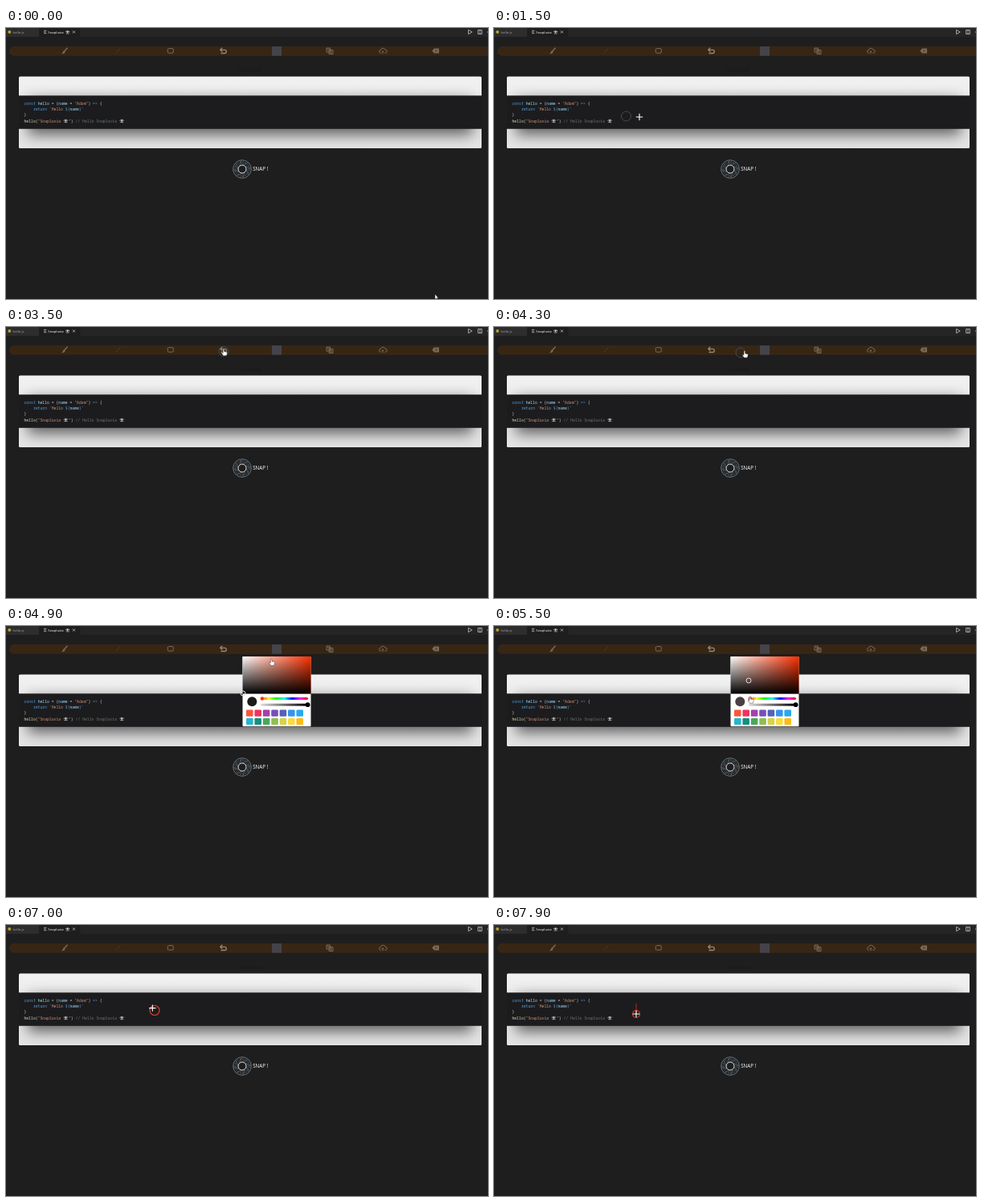
Animation of 600 by 338 pixels, one loop 8 s. Source, as an HTML page:

```html
<!DOCTYPE html>
<html lang="en">
<head>
<meta charset="utf-8">
<title>Code snapshot</title>
<style>
  html, body { margin: 0; width: 100%; height: 100%; overflow: hidden; background: #1e1e1e; }
  svg { display: block; width: 100vw; height: 100vh; }
  text { white-space: pre; }
  .ui { font-family: "Open Sans", "Noto Sans", sans-serif; }
  .code { font: 4.75px "Noto Sans Mono", "DejaVu Sans Mono", monospace; fill: #d4d4d4; }
  .kw { fill: #569cd6; } .id { fill: #9cdcfe; } .fn { fill: #dcdcaa; }
  .str { fill: #ce9178; } .note { fill: #68766a; }
  .icon { fill: none; stroke: #786b5c; stroke-width: 1; stroke-linejoin: round; }
  .solid { fill: #786b5c; stroke: none; }
</style>
</head>
<body>
<svg viewBox="0 0 600 338" preserveAspectRatio="none">
  <defs>
    <linearGradient id="card" x2="0" y2="1">
      <stop stop-color="#f1f1f1"/><stop offset="1" stop-color="#e4e4e4"/>
    </linearGradient>
    <linearGradient id="sat"><stop stop-color="#fff"/><stop offset="1" stop-color="#ff3000"/></linearGradient>
    <linearGradient id="val" x2="0" y2="1"><stop stop-opacity="0"/><stop offset="1"/></linearGradient>
    <linearGradient id="alpha"><stop stop-color="#ddd"/><stop offset="1" stop-color="#000"/></linearGradient>
    <linearGradient id="hue"></linearGradient>
    <filter id="soft" x="-10%" y="-80%" width="120%" height="260%"><feGaussianBlur stdDeviation="9"/></filter>
    <clipPath id="cardClip"><rect x="16" y="60.5" width="576" height="89.5" rx="1.5"/></clipPath>
    <g id="eye" fill="none" stroke="#e4e4e4" stroke-width=".7">
      <path d="M0-2.4Q2.7-5.2 5.4-2.4M.7-.4H4.7"/>
      <circle cx="2.7" cy="-2.2" r="1" fill="#e4e4e4" stroke="none"/>
    </g>
  </defs>

  <rect width="600" height="338" fill="#1e1e1e"/>
  <g class="ui" font-size="4.3">
    <rect width="600" height="11" fill="#252526"/>
    <rect width="41" height="11" fill="#2d2d2d"/>
    <rect x="41.3" width="51" height="11" fill="#1e1e1e"/>
    <circle cx="4.3" cy="5" r="2" fill="#b5a12c"/>
    <text x="8.5" y="6.7" fill="#a8a8a8">hello.js</text>
    <path d="M47 3.3h3.5M47 5h2.8M47 6.7h3.5" stroke="#ccc" stroke-width=".7"/>
    <text x="52.3" y="6.7" fill="#fff">Snapluvia</text>
    <use href="#eye" x="74" y="7.3"/>
    <path d="M83 3.5l3 3m0-3l-3 3" stroke="#ddd" stroke-width=".7"/>
    <g fill="none" stroke="#c5c5c5" stroke-width=".8">
      <path d="M575.6 2.3l4.6 2.7-4.6 2.7z"/>
      <path d="M587.6 2.5h4.8v5h-4.8zM590 2.5v5"/>
    </g>
    <circle cx="599.6" cy="5" r=".6" fill="#c5c5c5"/>
    <text x="304" y="55" font-size="6.4" text-anchor="middle" fill="#191919">Snapluvia</text>
  </g>

  <rect x="4" y="23" width="604" height="11.7" rx="5.8" fill="#382614"/>
  <g class="icon">
    <path d="M76.5 24.8l-4.2 4.4" stroke-width="1.6"/>
    <path class="solid" d="M71.8 28.2l2 1.8q-1 2.6-4.8 2.3q1.5-1 2.8-4.1z"/>
    <path d="M136.5 31.5l6-6" stroke="#493725"/>
    <rect x="201.3" y="25.6" width="7" height="5.6" rx="1.3"/>
    <path d="M267 27.3h5.2a2.1 2.1 0 0 1 0 4.2h-4.7M269.3 24.8l-2.6 2.5l2.6 2.5" stroke="#92877b" stroke-width="1.3"/>
    <rect x="331" y="23" width="12" height="11.7" fill="#444349" stroke="none"/>
    <path d="M399 25h4.5v5H399zM402 27.5h5v5h-5zM400 26.8h2.5M403.3 29.2h2.5M403.3 30.9h2.5"/>
    <path d="M467 31.3h-.3a2 2 0 0 1-.2-4a2.9 2.9 0 0 1 5.5-.2a2.1 2.1 0 0 1 .2 4.2h-.7M469 32.3v-3.6m-1.4 1.4l1.4-1.4l1.4 1.4"/>
    <path class="solid" d="M530.4 28.5l2.6-3h6v6h-6z"/>
    <path d="M534.2 27.2l2.6 2.6m0-2.6l-2.6 2.6" stroke="#382614" stroke-width=".7"/>
  </g>

  <g clip-path="url(#cardClip)">
    <rect x="16" y="60" width="576" height="91" fill="url(#card)"/>
    <rect x="27" y="90" width="554" height="43" opacity=".6" filter="url(#soft)"/>
    <rect x="16" y="84.3" width="576" height="41.5" fill="#1c1c1e"/>
  </g>
  <g class="code">
    <text x="22.5" y="96.3"><tspan class="kw">const</tspan> <tspan class="id">hello</tspan> = (<tspan class="id">name</tspan> = <tspan class="str">"Adam"</tspan>) <tspan class="kw">=&gt;</tspan> {</text>
    <text x="33.9" y="103.3"><tspan class="kw">return</tspan> <tspan class="str">`Hello </tspan><tspan class="kw">${</tspan><tspan class="id">name</tspan><tspan class="kw">}</tspan><tspan class="str">`</tspan></text>
    <text x="22.5" y="110.4">}</text>
    <text x="22.5" y="117.5"><tspan class="fn">hello</tspan>(<tspan class="str">"Snapluvia </tspan></text>
    <use href="#eye" x="71.7" y="118"/>
    <text x="78" y="117.5"><tspan class="str">"</tspan>) <tspan class="note">// Hello Snapluvia</tspan></text>
    <use href="#eye" x="141.5" y="118"/>
  </g>

  <g fill="none">
    <circle cx="294" cy="176" r="11.3" stroke="#7d8890" stroke-width=".8"/>
    <circle cx="294" cy="176" r="9" stroke="#4c5d6b" stroke-width="1" stroke-dasharray="2.2 .8"/>
    <circle cx="294" cy="176" r="7.2" stroke="#46525c" stroke-width=".6"/>
    <g id="blades" stroke="#64717b" stroke-width=".6"></g>
    <circle cx="294" cy="176" r="5" stroke="#dedede" stroke-width="1" fill="#1e1e1e"/>
  </g>
  <text class="ui" x="307.2" y="178.2" font-size="6.2" fill="#fff">SNAP !</text>

  <path id="arrow" fill="none" stroke="#000" stroke-width="1.1"/>
  <path id="stroke" fill="none" stroke="#b12a1e" stroke-width="1"/>

  <g id="picker">
    <rect x="294.5" y="38" width="85" height="87.3" rx="1" fill="#fff"/>
    <rect x="294.5" y="38" width="85" height="46.5" fill="url(#sat)"/>
    <rect x="294.5" y="38" width="85" height="46.5" fill="url(#val)"/>
    <circle id="shade" r="3" fill="none" stroke="#e4dede" stroke-width="1"/>
    <circle id="sample" cx="306.3" cy="94.3" r="6"/>
    <rect x="317" y="89" width="59" height="3" rx="1.5" fill="url(#hue)"/>
    <rect x="317" y="96.7" width="59" height="3" rx="1.5" fill="url(#alpha)"/>
    <circle cx="319" cy="90.5" r="2.6" fill="#ff3000" stroke="#fff" stroke-width=".6"/>
    <circle cx="375.6" cy="98.2" r="2.9"/>
    <g id="swatches"></g>
  </g>

  <circle id="ring" fill="none"/>
  <g id="pointer" fill="#fff" stroke="#111" stroke-width=".4"><path d="M0-3V3.2L1.5 2L2.6 4.3L3.5 3.9L2.5 1.7H4.2z"/></g>
  <path id="cross" d="M-4.2 0H4.2M0-4.2V4.2" stroke="#fff" stroke-width="1.1"/>
  <g id="hand" fill="#fff" stroke="#111" stroke-width=".4"><path d="M-1-2.8q.8-1 1.6 0V.1L3.7.8q.8.4.5 1.5L3.4 5.2H-.7L-3 2q.3-1.2 1.2-.5l.8.7z"/></g>
</svg>
<script>
const $ = id => document.getElementById(id);
const LOOP = 8000, STEP = 100;
const clamp = v => Math.max(0, Math.min(1, v));
const during = (t, a, b) => t >= a && t < b;

// Pointer path: time, x, y
const path = [
  [0, 534, 335], [200, 532, 333], [900, 330, 236], [1300, 150, 110], [1400, 164.5, 110],
  [1500, 181, 111], [1700, 189, 95], [1900, 189, 95], [2300, 129, 95], [2450, 129, 95],
  [2600, 204, 97], [2700, 212, 97], [3100, 270, 30], [3800, 272, 31], [4200, 307, 32],
  [4300, 312, 33], [4500, 337, 31], [4800, 337, 32], [5100, 317, 68], [5300, 317, 68],
  [5500, 319, 91], [5700, 319, 91], [5900, 378, 41], [6000, 378, 41], [6200, 193, 115],
  [6600, 193, 115], [7200, 177, 98], [7500, 177, 98], [7800, 177, 111], [8000, 177, 111]
];

function pointerAt(t) {
  const i = Math.max(1, path.findIndex(p => p[0] >= t));
  const [t0, x0, y0] = path[i - 1], [t1, x1, y1] = path[i];
  const k = clamp((t - t0) / (t1 - t0));
  return [x0 + (x1 - x0) * k, y0 + (y1 - y0) * k];
}

function build() {
  $("hue").innerHTML = Array.from({ length: 7 }, (_, i) =>
    `<stop offset="${i / 6}" stop-color="hsl(${i * 60},95%,50%)"/>`).join("");
  const colors = "f9563b ef3360 a340ad 7550b9 5361b9 3494ec 27a9ee 25b6cc 168f80 4ba85a 8fbd52 d7d347 fbdc3a fdbb14";
  $("swatches").innerHTML = colors.split(" ").map((c, i) =>
    `<rect x="${299 + i % 7 * 10.4}" y="${i < 7 ? 104.5 : 115}" width="8.6" height="8.2" rx="1.2" fill="#${c}"/>`).join("");
  $("blades").innerHTML = Array.from({ length: 8 }, (_, i) =>
    `<path d="M294 171L301 168" transform="rotate(${i * 45} 294 176)"/>`).join("");
}

function place(id, x, y, shown) {
  $(id).setAttribute("transform", `translate(${x} ${y})`);
  $(id).style.display = shown ? "" : "none";
}

function draw(t) {
  const [x, y] = pointerAt(t);
  const [rx, ry] = pointerAt(Math.max(0, t - 100));
  const red = t >= 5900;
  const open = clamp((t - 4600) / 200) * clamp((6370 - t) / 370);
  const picking = during(t, 4700, 6000);
  const inEditor = !picking && x > 16 && x < 592 && y > 84 && y < 126;
  const onButton = picking || during(t, 2900, 4700);

  $("picker").style.opacity = open;
  $("sample").setAttribute("fill", red ? "#f03a20" : t < 5100 ? "#1b1b1b" : "#4b4042");
  const shade = red ? [378, 41] : t < 5100 ? [295, 84] : [317, 68];
  $("shade").setAttribute("cx", shade[0]);
  $("shade").setAttribute("cy", shade[1]);

  const tip = t < 2300 ? x : 129;
  $("arrow").setAttribute("d", during(t, 2000, 3400)
    ? `M189 95H${tip}M${tip + 5} 92.3L${tip} 95L${tip + 5} 97.2` : "");
  $("stroke").setAttribute("d", t > 7500 ? `M177 98V${y}` : "");

  place("ring", rx, ry, t >= 200 && !picking);
  $("ring").setAttribute("r", t > 7500 ? 4.5 : 6);
  $("ring").setAttribute("stroke", red ? "#dc4029" : "#46515a");
  $("ring").setAttribute("stroke-width", red ? 1.2 : .9);
  place("cross", x, y, inEditor);
  place("hand", x, y, onButton);
  place("pointer", x, y, !inEditor && !onButton);
}

function tick(now) {
  draw(Math.floor(now % LOOP / STEP) * STEP);
  requestAnimationFrame(tick);
}

build();
draw(0);
requestAnimationFrame(tick);
</script>
</body>
</html>
```
